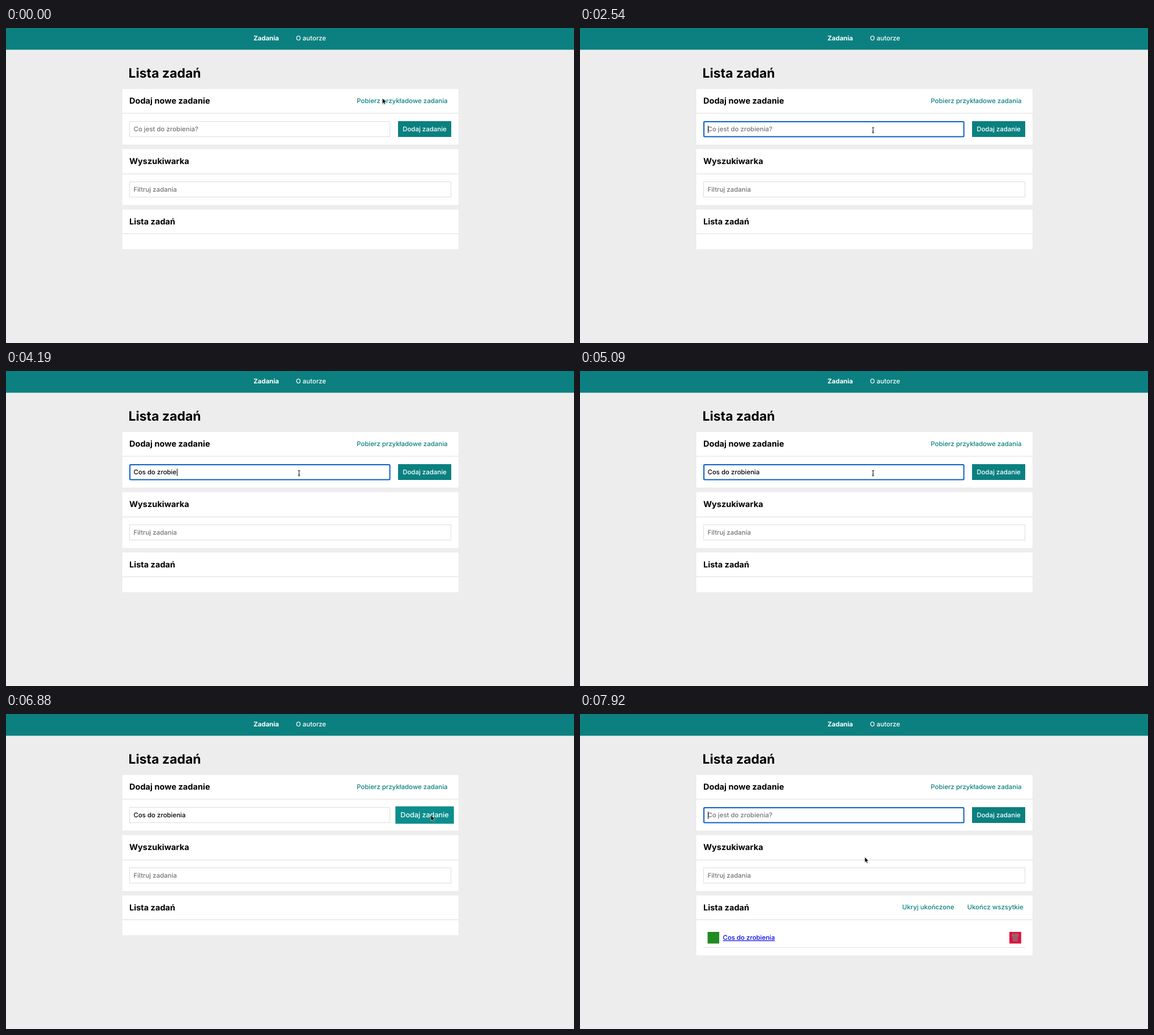
These frames come from a looping animation (1004x558 px, 8000 ms). An HTML page:

```html
<!DOCTYPE html>
<html lang="pl">
<head>
<meta charset="utf-8">
<title>Lista zadań</title>
<style>
  html, body { margin: 0; width: 100%; height: 100%; overflow: hidden; background: #ededed; }
  svg { display: block; width: 1004px; height: 558px; }
  text {
    font: 500 11.45px Inter, "Open Sans", sans-serif;
    font-optical-sizing: none;
    text-rendering: geometricPrecision;
    white-space: pre;
  }
  .bold { font-weight: 700; }
  .title { font-size: 23px; font-weight: 700; }
  .head { font-size: 14.55px; font-weight: 700; }
  .light { fill: #fff; }
  .hint { fill: #757575; }
  .link { fill: #0b8080; }
  .item { fill: #00e; text-decoration: underline; }
  .panel { fill: #fff; stroke: #e3e3e3; stroke-width: .6; }
  .rule { stroke: #ddd; }
  .field { fill: #fff; stroke: #ddd; }
</style>
</head>
<body>
<svg viewBox="0 0 1004 558">
  <rect width="1004" height="558" fill="#ededed"/>
  <rect width="1004" height="38.5" fill="#0c8080"/>
  <text class="light bold" x="437.5" y="22">Zadania</text>
  <text class="light" x="512.5" y="22">O autorze</text>
  <text class="title" x="216.5" y="88">Lista zadań</text>

  <rect class="panel" x="205" y="107.3" width="595.3" height="99.7"/>
  <path class="rule" d="M205 151H800"/>
  <text class="head" x="218" y="134">Dodaj nowe zadanie</text>
  <text class="link" x="620" y="133">Pobierz przykładowe zadania</text>
  <rect class="field" x="218.5" y="165.5" width="460" height="27"/>
  <rect id="ring" x="219" y="166" width="459.5" height="26.5" rx="1.5" fill="none" stroke="#0a5fc8" stroke-width="2"/>
  <text id="hint" class="hint" x="225.5" y="183">Co jest do zrobienia?</text>
  <text id="typed" x="225.5" y="183"></text>
  <rect id="caret" y="173" width="1" height="13"/>
  <g id="button">
    <rect id="face" x="693" y="165" width="94" height="28"/>
    <text class="light" x="740" y="183" text-anchor="middle">Dodaj zadanie</text>
  </g>

  <rect class="panel" x="205" y="214" width="595.3" height="100"/>
  <path class="rule" d="M205 258.5H800"/>
  <text class="head" x="218" y="240.5">Wyszukiwarka</text>
  <rect class="field" x="218.5" y="272.5" width="568" height="27"/>
  <text class="hint" x="225.5" y="290">Filtruj zadania</text>

  <rect id="list" class="panel" x="205" y="321" width="595.3" height="71.7"/>
  <path class="rule" d="M205 364.5H800"/>
  <text class="head" x="218" y="347.5">Lista zadań</text>
  <g id="task">
    <text class="link" x="569.5" y="346.3">Ukryj ukończone</text>
    <text class="link" x="684.5" y="346.3">Ukończ wszsytkie</text>
    <rect x="225.5" y="386" width="20.6" height="20.6" fill="#228b22"/>
    <text class="item" x="252.5" y="400">Cos do zrobienia</text>
    <rect x="759" y="386" width="20.8" height="20.6" fill="#dc143c"/>
    <path d="M763.5 391L765.2 402.3Q769.4 404.2 773.6 402.3L775.3 391Z" fill="#a4566a"/>
    <path d="M766.5 393.5L767.4 401.5M769.4 394V402M772.3 393.5L771.4 401.5" stroke="#8a6670" stroke-width=".8"/>
    <ellipse cx="769.4" cy="390.8" rx="6" ry="1.7" fill="#8d5261" stroke="#b98591" stroke-width=".7"/>
    <path class="rule" d="M218 413.7H787"/>
  </g>

  <path id="arrow" d="M0 0V9.6L2.2 7.6L3.8 11.2L5.4 10.5L3.9 7.1H6.9Z" stroke="#fff" stroke-width=".6"/>
  <path id="beam" d="M-2 -4.8Q0 -4.8 0 -3.6Q0 -4.8 2 -4.8M0 -3.6V3.8M-2 5Q0 5 0 3.8Q0 5 2 5M-1.2 1.8H1.2" fill="none" stroke="#222" stroke-width="1.1"/>
</svg>
<script>
  const LOOP = 8000, PHRASE = "Cos do zrobienia";
  const ui = {};
  document.querySelectorAll("[id]").forEach(el => ui[el.id] = el);

  // Each track lists [start time, value...]; a value holds until the next entry.
  const pointer = [
    [0, "arrow", 665.3, 124.3], [150, "arrow", 666, 126], [300, "arrow", 667, 127],
    [890, "arrow", 667.3, 128], [1340, "beam", 518, 181],
    [5840, "beam", 560, 187], [5990, "arrow", 735, 245], [6140, "arrow", 896, 264],
    [6290, "arrow", 842, 225], [6440, "arrow", 758, 184], [6580, "arrow", 751, 179.3],
    [7180, "arrow", 750, 181], [7330, "arrow", 740, 190], [7480, "arrow", 690, 213],
    [7630, "arrow", 600, 238], [7780, "arrow", 525, 250], [7920, "arrow", 503.3, 253.3]
  ];
  const letters = [
    [0, 0], [2690, 1], [2840, 2], [2990, 3], [3140, 5], [3290, 6], [3440, 7],
    [3590, 8], [3740, 9], [3890, 10], [4040, 11], [4190, 13], [4340, 14],
    [4490, 15], [4640, 16], [7030, 0]
  ];
  const caret = [
    [0, 0], [1640, 1], [2090, 0], [2540, 1], [5090, 0], [5540, 1],
    [5990, 0], [6440, 1], [6880, 0], [7030, 1], [7480, 0], [7920, 1]
  ];
  const focus = [[0, 0], [1640, 1], [6880, 0], [7030, 1]];
  const hover = [[0, 0], [6440, .5], [6580, 1], [7330, .5], [7480, 0]];
  const added = [[0, 0], [7030, 1]];

  const at = (track, t) => track.findLast(entry => entry[0] <= t).slice(1);
  const show = (el, on) => el.style.display = on ? "" : "none";

  function draw() {
    const t = performance.now() % LOOP;

    const [shape, x, y] = at(pointer, t);
    show(ui.arrow, shape === "arrow");
    show(ui.beam, shape === "beam");
    ui[shape].setAttribute("transform", `translate(${x} ${y})`);

    const [count] = at(letters, t);
    ui.typed.textContent = PHRASE.slice(0, count);
    show(ui.hint, !count);
    const width = count ? ui.typed.getComputedTextLength() : 0;
    ui.caret.setAttribute("x", Math.round(226 + width));
    show(ui.caret, at(caret, t)[0]);
    show(ui.ring, at(focus, t)[0]);

    const [lift] = at(hover, t);
    ui.button.setAttribute("transform", `translate(740 179) scale(${1 + lift * .1}) translate(-740 -179)`);
    ui.face.setAttribute("fill", `rgb(11 ${128 + lift * 14} ${128 + lift * 13})`);

    const [done] = at(added, t);
    show(ui.task, done);
    ui.list.setAttribute("height", done ? 107 : 71.7);

    requestAnimationFrame(draw);
  }
  draw();
</script>
</body>
</html>
```
